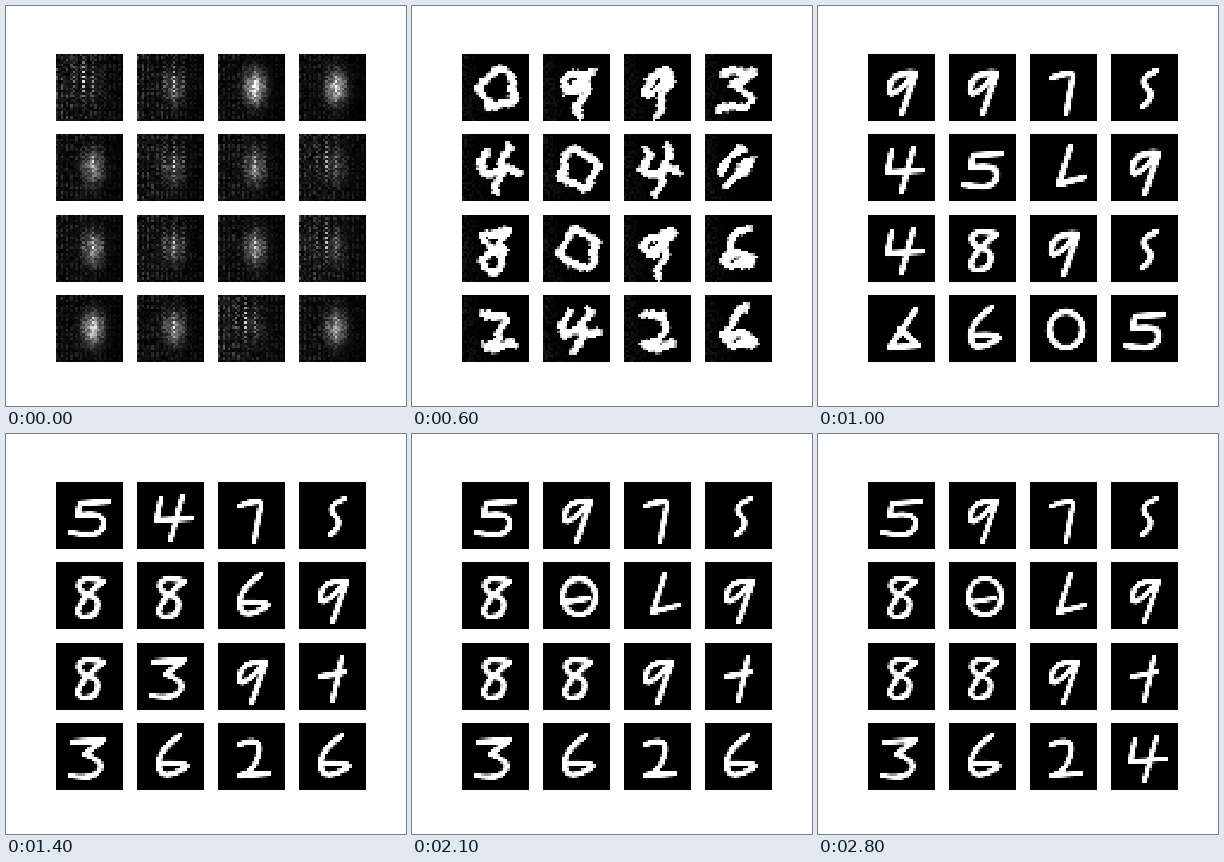
An HTML page with a canvas that plays this animation: 400 by 400 pixels, repeating every 2900 ms.

```html
<!DOCTYPE html>
<html lang="en">
<head>
<meta charset="utf-8">
<title>Generated digits over training</title>
<style>
html, body { margin: 0; width: 100%; height: 100%; overflow: hidden; background: #fff; }
canvas { display: block; }
</style>
</head>
<body>
<canvas id="stage" width="400" height="400"></canvas>
<script>
const SIZE = 28, STEP_MS = 100, STEPS = 29;

// Handwritten shapes on the 28-cell grid
const ring = 'M15 7A7 7.5 0 1 0 15.1 7';
const glyphs = {
  '/': 'M6 15 15 6M10 21 20 10',
  0: ring,
  θ: ring + 'M8 17 19 15',
  2: 'M9 9Q19 5 17 13T9 22L21 21',
  3: 'M7 8 20 7 12 13Q21 16 18 20T6 22',
  4: 'M10 7 8 16 23 15M19 6 14 24',
  5: 'M22 8 10 9 9 14Q21 12 20 18T6 21',
  6: 'M18 5Q8 12 9 18T18 20 10 17',
  7: 'M9 10Q19 6 18 10T15 25',
  8: 'M20 8C6 4 8 13 14 14S18 23 12 23 10 15 20 8',
  9: 'M20 8Q10 7 9 14T20 8L14 25',
  L: 'M17 5 12 21 23 18',
  s: 'M19 7Q11 10 15 14T13 22',
  t: 'M18 6 14 24M9 14 19 12',
  Δ: 'M20 6 9 22 21 21 13 14'
};

// Step, the 16 shapes in reading order, line width, wobble and edge noise
const poses = [
  { step: 0, noise: 0 },
  { step: 3, shapes: '8/0/' + '//3/' + '85/3' + '8/62', width: 3.9, wobble: 1.1, noise: .95 },
  { step: 6, shapes: '0993' + '404/' + '8096' + '2426', width: 3.5, wobble: .8, noise: .1 },
  { step: 10, shapes: '997s' + '45L9' + '489s' + 'Δ605', width: 2.5, wobble: .3, noise: 0 },
  { step: 14, shapes: '547s' + '8869' + '839t' + '3626', width: 2.3, wobble: .3, noise: 0 },
  { step: 21, shapes: '597s' + '8θL9' + '889t' + '3626', width: 2.3, wobble: .2, noise: 0 },
  { step: 28, shapes: '597s' + '8θL9' + '889t' + '3624', width: 2.2, wobble: 0, noise: 0 }
];
const glowLevels = [.1, .35, 1, .85, .6, .3, .5, .24, .6, .35, .6, .2, .85, .55, .15, .65];

const stage = document.getElementById('stage').getContext('2d');
stage.imageSmoothingEnabled = false;
const small = document.createElement('canvas');
small.width = small.height = SIZE;
const pen = small.getContext('2d', { willReadFrequently: true });

const random = (x, y, seed) => {
  const v = Math.sin(x * 12.9898 + y * 78.233 + seed * 37.719) * 43758.5453;
  return v - Math.floor(v);
};
const bell = (x, y) => Math.exp(-x * x - y * y);
const mix = (a, b, t) => a + (b - a) * t;
const sharpen = v => {
  const t = Math.min(1, Math.max(0, (v - .12) / .7));
  return t * t * (3 - 2 * t);
};
const grid = cell => Float32Array.from({ length: SIZE * SIZE },
  (_, i) => cell(i % SIZE, Math.floor(i / SIZE)));

// Brightness of each cell for one stroked shape, bent by a gentle wave
function rasterize({ step, shapes, width, wobble }, n) {
  pen.fillStyle = '#000';
  pen.fillRect(0, 0, SIZE, SIZE);
  pen.save();
  pen.translate(step < 6 ? -2 : 0, 0);
  pen.strokeStyle = '#fff';
  pen.lineWidth = width;
  pen.lineCap = pen.lineJoin = 'round';
  pen.stroke(new Path2D(glyphs[shapes[n]]));
  pen.restore();
  const { data } = pen.getImageData(0, 0, SIZE, SIZE);
  return grid((x, y) => {
    const sx = Math.round(x + wobble * Math.sin(y * .6 + n * 2 + step));
    const sy = Math.round(y + wobble * Math.sin(x * .5 + n * 3 + step));
    return sx < 0 || sx >= SIZE || sy < 0 || sy >= SIZE ? 0 : data[(sy * SIZE + sx) * 4] / 255;
  });
}

// Untrained output: a soft spot, dotted columns and a faint lattice
function rasterizeGlow(level, n) {
  const dots = .1 + .9 * (1 - level) ** 2;
  const column = level < .25 ? 11 : 15;
  return grid((x, y) => {
    const r = random(x, y, n);
    const bright = .5 + .5 * r + (x % 4 === 3 && y % 2 ? .3 : 0);
    const spot = level * bell((x - 15) / 4, (y - 13.5) / 6.5) * bright;
    const dot = (x - column) % 4 === 0 && y % 2 ? dots * bell((x - column) / 5, (y - 10) / 8) : 0;
    const lattice = (y % 4 < 3 && x % 2 === 0 ? .2 : .07) * r * (.7 + dots) * (1.3 - x / SIZE);
    return spot + dot + lattice;
  });
}

const tiles = glowLevels.map((level, n) =>
  poses.map(pose => pose.shapes ? rasterize(pose, n) : rasterizeGlow(level, n)));

function drawStep(step) {
  let k = 0;
  while (k < poses.length - 2 && step >= poses[k + 1].step) k++;
  const from = poses[k], to = poses[k + 1];
  const t = (step - from.step) / (to.step - from.step);
  const noise = mix(from.noise, to.noise, t);
  const image = pen.createImageData(SIZE, SIZE);

  tiles.forEach((masks, n) => {
    for (let i = 0; i < SIZE * SIZE; i++) {
      const x = i % SIZE, y = Math.floor(i / SIZE);
      let v = mix(masks[k][i], masks[k + 1][i], t);
      if (k > 0) v = sharpen(v);
      const grain = random(x, y, n + step * 16) ** 1.7;
      v = Math.max(v, noise * grain * bell(x / (4 + y / 6), 0));
      image.data.fill(Math.min(1, v) * 255, i * 4, i * 4 + 3);
      image.data[i * 4 + 3] = 255;
    }
    pen.putImageData(image, 0, 0);
    const left = Math.round(50 + (n % 4) * 80.87);
    const top = Math.round(48 + Math.floor(n / 4) * 80.35);
    stage.drawImage(small, left, top, 67, 67);
  });
}

stage.fillStyle = '#fff';
stage.fillRect(0, 0, 400, 400);
const start = performance.now();
let shown = -1;
function tick() {
  const step = Math.floor((performance.now() - start) / STEP_MS) % STEPS;
  if (step !== shown) drawStep(shown = step);
  requestAnimationFrame(tick);
}
tick();
</script>
</body>
</html>
```
